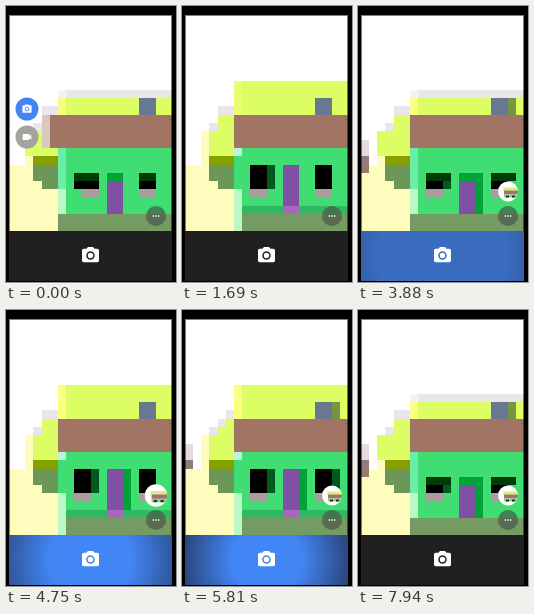
Write an HTML page with a canvas that moves like this. It is 170 px wide and 276 px high and loops after 8000 ms.

```html
<!DOCTYPE html>
<html lang="en">
<head>
<meta charset="utf-8">
<title>Camera viewfinder</title>
<style>
  html, body { margin: 0; width: 100%; height: 100%; overflow: hidden; background: #000; }
  canvas { display: block; width: 170px; height: 276px; }
</style>
</head>
<body>
<canvas id="stage" width="170" height="276"></canvas>
<script>
const ctx = document.getElementById('stage').getContext('2d');
const LOOP = 8000, STEP = 62.5;

const CAMERA = new Path2D('M9 2 7.2 4H4Q2 4 2 6V18Q2 20 4 20H20Q22 20 22 18V6Q22 4 20 4H16.8L15 2Z' +
  'M17 12A5 5 0 1 1 7 12A5 5 0 1 1 17 12ZM15.2 12A3.2 3.2 0 1 0 8.8 12A3.2 3.2 0 1 0 15.2 12Z');
const VIDEO = new Path2D('M4 6H16Q17 6 17 7V10.5L21 6.5V17.5L17 13.5V17Q17 18 16 18H4Q3 18 3 17V7Q3 6 4 6Z');

const C = {
  lilac: '#ece5ee', yellow: '#ddfd65', lemon: '#feff86', cream: '#fffcbe', slate: '#687890',
  brown: '#a27464', olive: '#86a000', moss: '#6b9858', wall: '#40dd72',
  mint: '#6aefa6', paleMint: '#bdf7c8', ground: '#749b62', shade: '#32b764', deep: '#00a338',
  bottle: '#00581e', pine: '#003c08', black: '#000', sill: '#aa9d9b', door: '#8050a5'
};

// Keyed value: pairs of [time, value], eased between neighbours.
function track(t, keys) {
  let [t0, v0] = keys[0];
  for (const [t1, v1] of keys) {
    if (t < t1) {
      const p = (t - t0) / (t1 - t0);
      return v0 + (v1 - v0) * p * p * (3 - 2 * p);
    }
    t0 = t1; v0 = v1;
  }
  return v0;
}

// Rectangle in viewfinder mosaic units: 20 columns by 26 rows.
function cell(x, y, w, h, color, alpha = 1) {
  if (alpha <= 0) return;
  const px = n => Math.round(3 + n * 8.15), py = n => Math.round(9 + n * 8.308);
  ctx.globalAlpha = alpha;
  ctx.fillStyle = color;
  ctx.fillRect(px(x), py(y), px(x + w) - px(x), py(y + h) - py(y));
  ctx.globalAlpha = 1;
}

function disc(x, y, r, color) {
  ctx.fillStyle = color;
  ctx.beginPath();
  ctx.arc(x, y, r, 0, 7);
  ctx.fill();
}

function icon(path, x, y, scale) {
  ctx.save();
  ctx.translate(x, y);
  ctx.scale(scale, scale);
  ctx.translate(-12, -12);
  ctx.fillStyle = '#fff';
  ctx.fill(path, 'evenodd');
  ctx.restore();
}

function bush(low, right) {
  const shifted = right * (1 - low);
  cell(0, 18, 7, 8, C.cream);
  cell(2, 14, 1, 4, C.cream);
  cell(2, 14, 1, 3, C.yellow, low);
  cell(4, 11, 2, 1, C.lilac);
  cell(3, 13, 1, 1, C.lilac);
  cell(4, 12, 2, 5, C.yellow);
  cell(4, 11, 1, 1, '#fff', shifted);
  cell(4, 12, 1, 1, C.lilac, shifted);
  cell(3, 14, 1, 3, C.yellow);
  cell(3, 17, 3, 1, C.olive);
  cell(3, 18, 3, 2, C.moss);
  cell(4, 20, 2, 1, C.moss);
}

function windowAt(x, low, left) {
  const wide = x < 10 ? 1 : 0;
  cell(x, 18, 2, 3, C.black);
  cell(x + 2, 18, wide, 3, C.bottle);
  cell(x, 21, 2, 1, C.sill);
  cell(x, 18, 2 + wide, 1, C.wall, low);
  cell(x, 19, 2 + wide, 1, C.pine, low);
  cell(x + 2, 20, wide, 1, C.black, left);
  cell(x, 21, wide, 1, C.wall, left);
  cell(x + 2, 21, wide, 1, C.sill, left);
}

function viewfinder(t) {
  const low = track(t, [[0, 1], [500, 1], [900, 0], [2900, 0], [3400, 1], [4150, 1], [4500, 0], [6400, 0], [6900, 1]]);
  const left = track(t, [[0, 1], [400, 1], [800, 0]]);
  const right = track(t, [[0, 0], [2900, 0], [3500, 1], [4100, 1], [4500, 0], [5100, 0], [5500, 1]]);
  const doorShade = track(t, [[0, 0], [2900, 0], [3400, 1]]);
  const edge = track(t, [[0, 0.8], [1690, 0.4], [2690, 0.9]]);

  cell(0, 0, 20, 26, '#fff');
  bush(low, right);
  cell(0, 15, 1, 2, '#e4d9e5', right);
  cell(0, 17, 1, 1, '#957a75', right);
  cell(0, 18, 1, 1, '#957a75', right * low);

  // Roof
  cell(6, 8, 14, 4, C.yellow);
  cell(6, 8, 1, 4, C.lemon, edge);
  cell(6, 8, 14, 1, '#fff', low);
  cell(6, 9, 14, 1, C.lilac, low);
  cell(6, 9, 1, 1, '#fff', low * 0.5);
  cell(16, 10, 2, 2, C.slate);
  cell(18, 10, 1, 2, '#789343', right);
  cell(6, 12, 14, 4, C.brown);
  cell(5, 12, 1, 4, C.brown, left);
  cell(4, 12, 1, 4, '#d9c8c1', left);

  // Facade with its translucent first column
  cell(6, 16, 14, 8, C.wall);
  cell(6, 23, 14, 1, C.shade, 1 - low);
  cell(6, 24, 14, 2, C.ground);
  cell(6, 16, 1, 5, C.mint, low);
  cell(6, 16, 1, 1, '#bdf5d3', 1 - low);
  cell(6, 21, 1, 3, C.paleMint);
  cell(6, 24, 1, 2, C.paleMint, 1 - low);

  windowAt(8, low, left);
  windowAt(16, low, 0);
  cell(18, 19, 1, 1, C.pine, right * low);
  cell(18, 18, 1, 3, C.bottle, right * (1 - low));
  cell(12, 18, 2, 6, C.door);
  cell(12, 23, 2, 1, '#a866bf', 1 - low);
  cell(12, 18, 2, 1, C.wall, low);
  cell(12, 19, 2, 1, C.deep, low);
  cell(14, 18, 1, 1, C.deep, doorShade * (1 - low));
  cell(14, 19, 1, 4, C.deep, doorShade);
  cell(14, 23, 1, 1, C.deep, doorShade * low);

  // Soft border
  ctx.strokeStyle = 'rgba(0,0,0,.5)';
  ctx.strokeRect(3.5, 9.5, 162, 265);
}

function modeButtons(t) {
  const scale = track(t, [[0, 1], [300, 1], [650, 0]]);
  if (scale <= 0) return;
  ctx.globalAlpha = scale;
  disc(21, 103, 11.5 * scale, '#4285f4');
  icon(CAMERA, 21, 103, 0.46 * scale);
  disc(21, 131, 11.5 * scale, '#a5a3a0');
  icon(VIDEO, 21, 131, 0.48 * scale);
  ctx.globalAlpha = 1;
}

function thumbnail(t) {
  const scale = track(t, [[0, 0], [2950, 0], [3200, 1], [4400, 1], [4700, 1.12], [4800, 1.12], [5100, 1]]);
  if (scale <= 0) return;
  ctx.save();
  ctx.translate(150, 185.5);
  ctx.scale(scale, scale);
  disc(0, 0, 10, '#fff');
  ctx.clip();
  const strip = (x, y, w, h, color) => { ctx.fillStyle = color; ctx.fillRect(x, y, w, h); };
  strip(-5, -4, 15, 3, '#dcef7c');
  strip(-4, -1, 14, 4, C.brown);
  strip(-4, 3, 14, 3, '#80d58e');
  strip(-2, 4, 3, 2, '#173c23');
  strip(4, 4, 3, 2, '#173c23');
  ctx.restore();
}

function shutterBar(t) {
  const fill = color => { ctx.fillStyle = color; ctx.fillRect(3, 225, 163, 50); };
  fill('#202020');
  const blue = track(t, [[0, 0], [3450, 0], [4080, 1], [6100, 1], [6480, 0]]);
  if (blue > 0) {
    const radius = track(t, [[0, 160], [3880, 160], [4750, 104], [5810, 88]]);
    const glow = ctx.createRadialGradient(84.5, 250, radius * 0.4, 84.5, 250, radius);
    glow.addColorStop(0, '#4285f4');
    glow.addColorStop(1, '#28406f');
    ctx.globalAlpha = blue;
    fill(glow);
    ctx.globalAlpha = 1;
  }
  icon(CAMERA, 84.5, 249.5, 0.85);
}

function draw(now) {
  const t = Math.floor((now % LOOP) / STEP) * STEP;
  ctx.fillStyle = '#000';
  ctx.fillRect(0, 0, 170, 276);
  viewfinder(t);
  modeButtons(t);
  thumbnail(t);
  disc(150, 210, 10, 'rgba(70,82,70,.65)');
  for (const x of [147.2, 150, 152.8]) disc(x, 210, 0.9, '#d5ddd2');
  shutterBar(t);
}

const start = performance.now();
function frame() {
  draw(performance.now() - start);
  requestAnimationFrame(frame);
}
frame();
</script>
</body>
</html>
```
